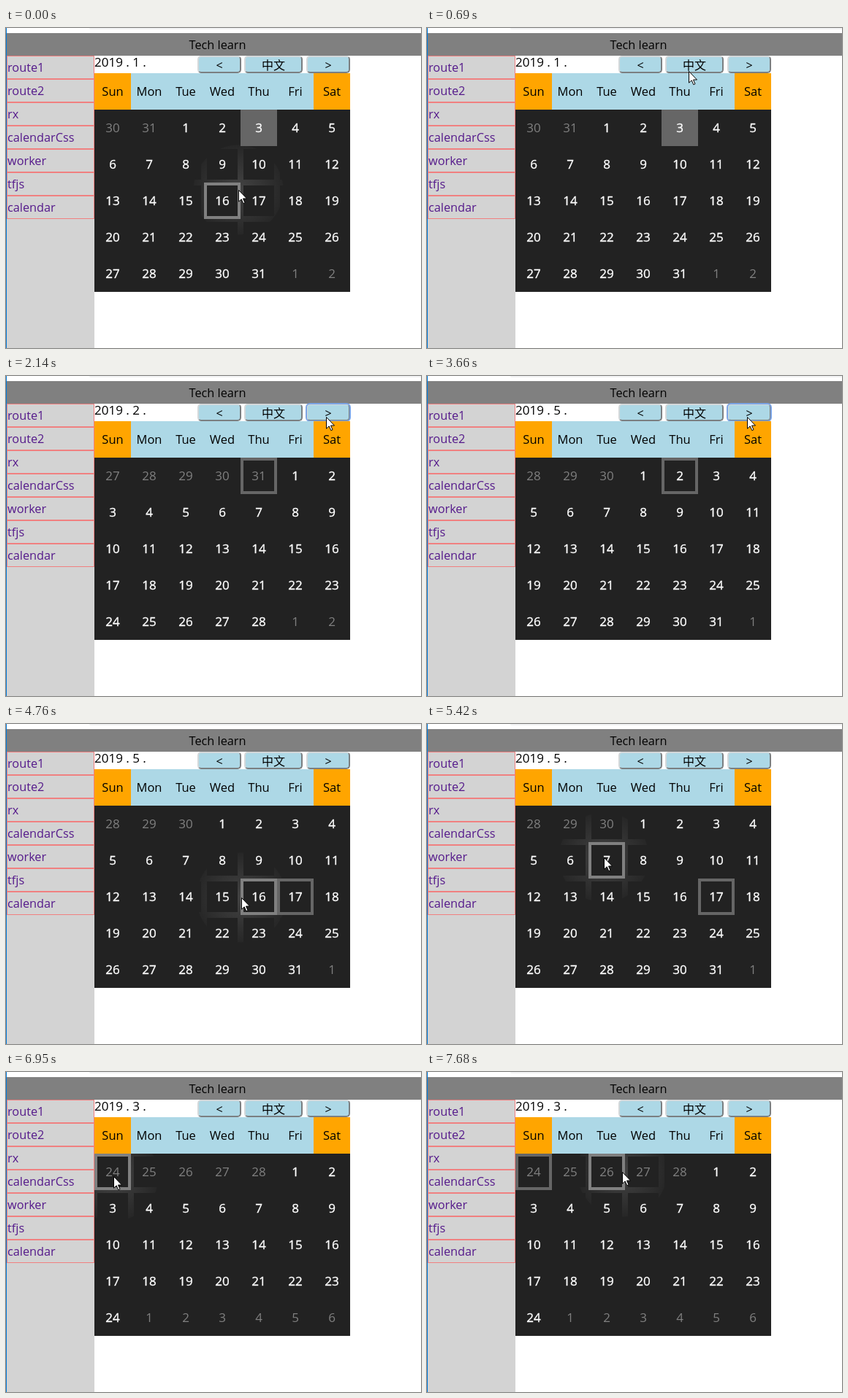
Write an HTML page that moves like this. It is 568 px wide and 439 px high and loops after 7990 ms.

```html
<!DOCTYPE html>
<html lang="en">
<head>
<meta charset="utf-8">
<title>Calendar</title>
<style>
  html, body { margin: 0; width: 100%; height: 100%; overflow: hidden; background: #fff; }
  body { position: relative; font: 16.3px/30px "Open Sans", "Noto Sans", "Noto Sans CJK SC", "Noto Sans CJK", sans-serif; color: #000; }
  body > * { position: absolute; box-sizing: border-box; }
  #tabs { left: 114px; top: 0; width: 454px; height: 2px; background: #f1f2f3; border-radius: 0 0 0 2px; }
  #edge { left: 0; top: 0; width: 1px; height: 439px; background: #0078d7; }
  #title { left: 1px; top: 7px; width: 567px; height: 31px; background: #808080; padding: 1px 0 0 10px; text-align: center; }
  #menu { left: 1px; top: 38px; width: 120px; height: 401px; background: #d3d3d3; color: #551a8b; }
  #menu div { height: 30px; border: 1px solid #f08080; }
  #date { left: 121px; top: 37px; font-size: 17px; line-height: 19px; white-space: pre; }
  .button { top: 38px; width: 60px; height: 24px; border: 2px solid; border-color: #d3d8da #7b7f81 #7b7f81 #d3d8da;
    border-radius: 5px; background: #add8e6; font-size: 16px; line-height: 22px; text-align: center; }
  .button.focus { outline: 2px solid #7ba5e6; outline-offset: -1px; }
  #week, #grid { left: 121px; width: 350px; display: grid; grid-template-columns: repeat(7, 50px); grid-auto-rows: 50px; text-align: center; }
  #week { top: 62px; font-size: 16.5px; line-height: 50px; background: #add8e6; }
  #week :first-child, #week :last-child { background: #ffa500; }
  #grid { top: 112px; height: 250px; background-color: #222; font-size: 17px; line-height: 42px; color: #fff; }
  #grid div { box-sizing: border-box; border: 4px solid transparent; background: #222 padding-box; -webkit-text-stroke: .35px; }
  #grid .other { color: #808080; -webkit-text-stroke: 0; }
  #grid .selected { border-color: #666; }
  #grid .today { background: #666; }
  #grid .hover { border-color: #808080; }
  #cursor { left: 0; top: 0; overflow: visible; }
</style>
</head>
<body>
<div id="tabs"></div>
<div id="title">Tech learn</div>
<div id="menu"></div>
<div id="edge"></div>
<div id="date"></div>
<div class="button" id="prev" style="left:262px">&lt;</div>
<div class="button" id="lang" style="left:326px;width:80px"></div>
<div class="button" id="next" style="left:411px">&gt;</div>
<div id="week"></div>
<div id="grid"></div>
<svg id="cursor" width="13" height="21">
  <path d="M.5 .5V16.2L4.2 12.8 6.8 18.7 9 17.7 6.5 12H11.5Z" fill="#fff" stroke="#000"/>
</svg>
<script>
const LOOP = 7990, YEAR = 2019, CELL = 50, LEFT = 121, TOP = 112;
const DAYS = {
  en: ['Sun', 'Mon', 'Tue', 'Wed', 'Thu', 'Fri', 'Sat'],
  zh: ['日', '一', '二', '三', '四', '五', '六']
};

// Pointer strokes: start and end in ms, and where the stroke leads.
const ORIGIN = { x: 318, y: 222 };
const strokes = [
  { from: 0, to: 690, x: 358, y: 59 },       // language button
  { from: 1580, to: 1860, x: 438, y: 56 },   // next button
  { from: 3660, to: 4200, x: 392, y: 236 },  // the 17th
  { from: 4350, to: 4760, x: 322, y: 238 },
  { from: 4760, to: 5270, x: 244, y: 204 },
  { from: 5270, to: 5700, x: 238, y: 144 },  // a day of the previous month
  { from: 5980, to: 6540, x: 147, y: 143 },  // and again
  { from: 6950, to: 7680, x: 267, y: 137 }
];

// What each click changes.
const changes = [
  { at: 0, month: 1, selected: 4, lang: 'en', focus: '' },
  { at: 990, focus: 'lang' },
  { at: 1150, lang: 'zh' },
  { at: 1580, lang: 'en' },
  { at: 2140, month: 2, focus: 'next' },
  { at: 2720, month: 3 },
  { at: 3270, month: 4 },
  { at: 3530, month: 5 },
  { at: 4200, focus: '' },
  { at: 4350, selected: 19 },
  { at: 5980, month: 4, selected: 2 },
  { at: 6680, month: 3, selected: 0 }
];

const $ = id => document.getElementById(id);
const fill = (id, items) => items.map(text => {
  const el = document.createElement('div');
  el.textContent = text;
  return $(id).appendChild(el);
});

fill('menu', ['route1', 'route2', 'rx', 'calendarCss', 'worker', 'tfjs', 'calendar']);
const heads = fill('week', DAYS.en);
const cells = fill('grid', Array(35).fill(''));

function pointerAt(t) {
  let { x, y } = ORIGIN;
  for (const stroke of strokes) {
    const p = Math.min(1, Math.max(0, (t - stroke.from) / (stroke.to - stroke.from)));
    x += (stroke.x - x) * p;
    y += (stroke.y - y) * p;
  }
  return { x: Math.round(x), y: Math.round(y) };
}

function monthDays(month) {
  const offset = new Date(YEAR, month - 1, 1).getDay();
  const before = new Date(YEAR, month - 1, 0).getDate();
  let count = new Date(YEAR, month, 0).getDate();
  // A month too long for five rows stops at the first cell of the last row.
  if (offset + count > 35) count = 29 - offset;
  return cells.map((_, i) => {
    const day = i - offset + 1;
    if (day < 1) return { day: before + day, other: true };
    return day > count ? { day: day - count, other: true } : { day, other: false };
  });
}

function hoveredCell(x, y) {
  const col = Math.floor((x - LEFT) / CELL), row = Math.floor((y - TOP) / CELL);
  return col >= 0 && col < 7 && row >= 0 && row < 5 ? row * 7 + col : -1;
}

function draw({ month, selected, lang, focus }, { x, y }) {
  const hover = hoveredCell(x, y);
  $('date').textContent = `${YEAR} . ${month} .`;
  $('lang').textContent = lang === 'en' ? '中文' : 'English';
  for (const id of ['lang', 'next']) $(id).classList.toggle('focus', focus === id);
  heads.forEach((el, i) => el.textContent = DAYS[lang][i]);
  monthDays(month).forEach(({ day, other }, i) => {
    const el = cells[i];
    el.textContent = day;
    el.classList.toggle('other', other);
    el.classList.toggle('selected', i === selected);
    el.classList.toggle('today', month === 1 && day === 3 && !other);
    el.classList.toggle('hover', i === hover);
  });
  // The glow shows only through the transparent cell borders.
  $('grid').style.backgroundImage = hover < 0 ? 'none' :
    `radial-gradient(circle at ${x - LEFT}px ${y - TOP}px, #444, #272727 61px, #222 62px)`;
  $('cursor').style.transform = `translate(${x}px, ${y}px)`;
}

const start = performance.now();
function tick() {
  const t = (performance.now() - start) % LOOP;
  draw(Object.assign({}, ...changes.filter(c => c.at <= t)), pointerAt(t));
  requestAnimationFrame(tick);
}
tick();
</script>
</body>
</html>
```
